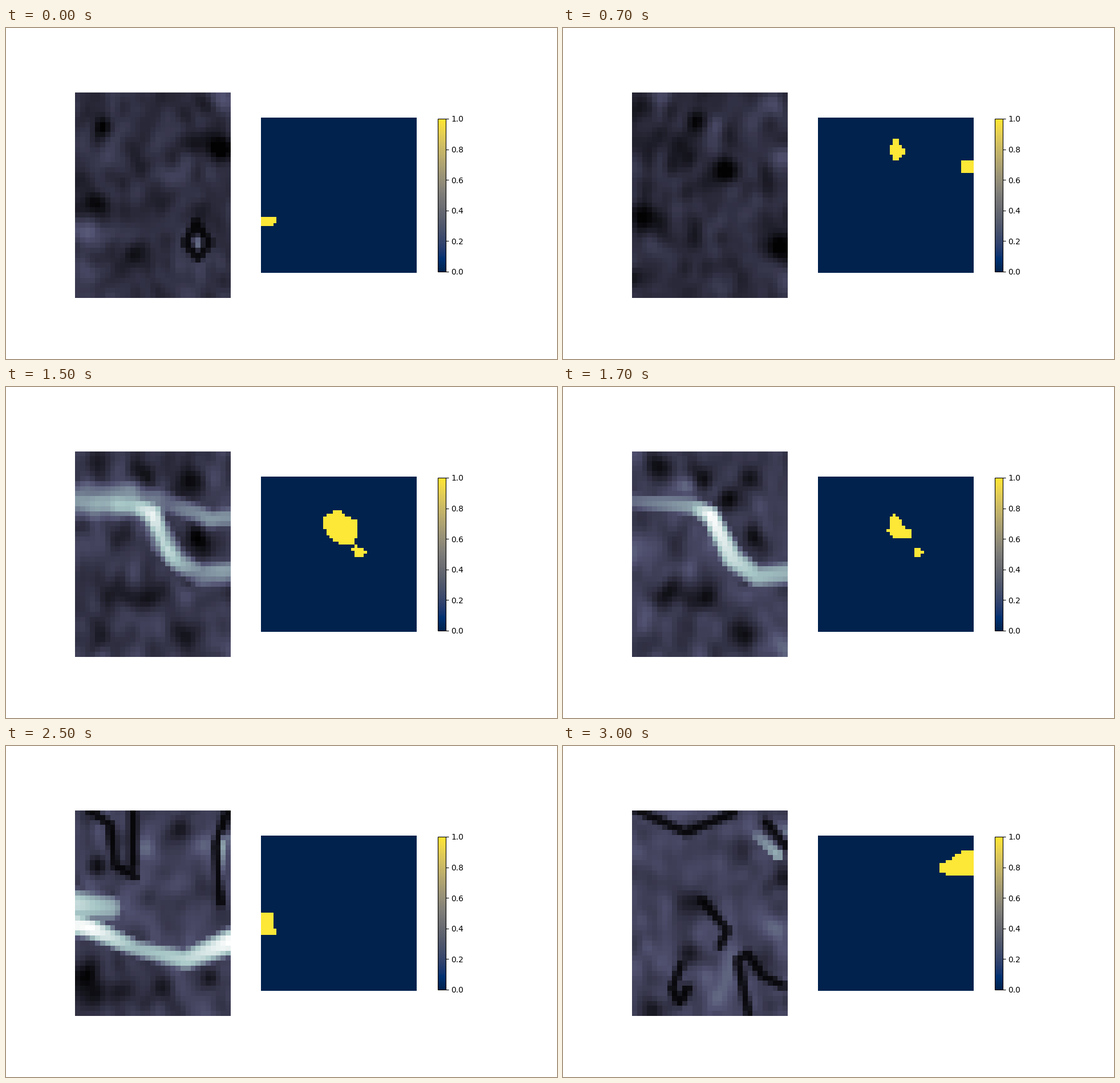
These frames come from a looping animation (966x580 px, 3.1 s). A matplotlib script:

```python
import numpy as np
import matplotlib.pyplot as plt
from matplotlib.animation import FuncAnimation
from matplotlib.path import Path

FRAMES, STEP_MS = 31, 100
ROWS, COLS, SIDE = 41, 31, 50

yy, xx = np.mgrid[:ROWS, :COLS] + 0.5
my, mx = np.mgrid[:SIDE, :SIDE]
centres = np.column_stack([mx.ravel(), my.ravel()]) + 0.5
keys = []


def texture(seed):
    """Smooth unit-variance grain, a little longer vertically."""
    down, across = 8, 4
    n = np.random.default_rng(seed).normal(size=(ROWS + down, COLS + across))
    for _ in range(down):
        n = n[1:] + n[:-1]
    for _ in range(across):
        n = n[:, 1:] + n[:, :-1]
    return n / n.std()


def spots(items):
    return sum(np.exp(-0.65 * ((xx - x) ** 2 + (yy - y) ** 2) / r ** 2)
               for x, y, r in items)


def stroke(points):
    """Soft polyline through (x, y, width, level) points."""
    p = np.array(points, float)
    t = np.linspace(0, len(p) - 1, 40 * len(p))
    x, y, w, v = (np.interp(t, range(len(p)), c)[:, None, None] for c in p.T)
    return (v * np.exp(-(np.hypot(xx - x, yy - y) / w) ** 3)).max(axis=0)


def nearest(cells):
    best = np.full((SIDE, SIDE), np.inf)
    for cy, cx in np.argwhere(cells):
        np.minimum(best, np.hypot(mx - cx, my - cy), out=best)
    return best


def signed_distance(polygons):
    inside = sum(Path(p).contains_points(centres) for p in polygons) > 0
    inside = inside.reshape(SIDE, SIDE)
    return nearest(~inside) * inside - nearest(inside) * ~inside


def add_key(frame, base, light, dark, mask, lines=(), cuts=()):
    scan = base + 0.13 * spots(light) - 0.2 * spots(dark)
    scan = np.clip(scan + 0.035 * texture(frame), 0.015, 1)
    for line in lines:
        scan = np.maximum(scan, stroke(line))
    for cut in cuts:
        scan *= 1 - stroke([(x, y, 1, 0.85) for x, y in cut])
    keys.append((frame, scan, signed_distance(mask)))


add_key(
    0, 0.22,
    light=[(30, 2, 2), (2, 28.5, 2.5), (24.5, 30, 1.3), (24.5, 30, 1)],
    dark=[(24, 10, 2), (29, 11, 2), (4.5, 21.7, 2), (11.5, 33, 2.2),
          (5.7, 7, 1.5)],
    mask=[[(0, 32), (5, 32), (5, 34), (4, 34), (4, 35), (0, 35)]],
    cuts=[[(24, 26), (22, 30), (24.5, 33), (26.7, 30), (24, 26)]])

add_key(
    7, 0.2,
    light=[(16.5, 6.5, 1.8), (15.8, 10.5, 2), (29.5, 12.5, 1.8), (28.5, 3, 2),
           (6, 1, 1.8)],
    dark=[(12.7, 5.5, 1.6), (18.5, 15.5, 2), (2.5, 24.5, 2.3), (30, 31, 2.2)],
    mask=[[(24, 7), (26, 7), (26, 8.8), (28.2, 11), (26, 14), (24, 14),
           (23.1, 11), (23.1, 9), (24, 9)],
          [(46, 14), (50, 14), (50, 18), (46, 18)]])

add_key(
    12, 0.2,
    light=[(28, 2, 3), (8, 4, 1.8)],
    dark=[(14, 4.2, 1.8), (20.5, 5, 2), (24, 18, 2.3), (2.5, 25, 2.3),
          (3, 33, 2)],
    mask=[[(0, 8.3), (22, 8.4), (22, 8.6), (27, 9.5), (35, 10.5), (42, 14.6),
           (50, 16.4), (50, 20), (33.6, 20), (32, 18), (32, 22), (33, 22),
           (33, 25), (32, 25), (32, 27), (23, 25.9), (23, 22.2), (19, 19.4),
           (10, 18.6), (4, 16), (4, 15), (0, 15)],
          [(16, 7), (18, 7), (18, 8), (16, 8)]],
    lines=[[(0, 10, 4.2, .85), (13, 10, 3.7, .93), (19, 10.4, 2.1, 1),
            (27, 13.6, 1.9, .98), (31, 13.2, 2, .93)],
           [(15, 12, 2.4, .83), (17, 19, 2, .8), (21, 23, 1.9, .52),
            (31, 23.3, 2, .54)]])

add_key(
    17, 0.27,
    light=[(1.5, 19, 2.5), (30, 39, 2.5), (10.3, 7, 1.8)],
    dark=[(5, 2.5, 2.2), (14, 5.8, 1.8), (19, 9.5, 1.8), (23.2, 5.5, 1.8),
          (25, 17.8, 2.2), (8, 28, 2.4), (14, 30, 2.2), (22, 36, 2.3)],
    mask=[[(24.2, 12), (25.2, 12.2), (28.3, 17), (30, 17), (30, 20), (24, 20),
           (22, 17), (23.2, 17), (23.2, 13)],
          [(31, 23), (33, 23), (34.2, 24.5), (33, 26), (31, 26)]],
    lines=[[(0, 10, 2.1, .45), (12, 11, 2.2, .63), (15.6, 12.7, 2, 1),
            (20, 21.5, 2.5, .85), (25, 25, 2.5, .72), (31, 24.3, 2.6, .68)]])

add_key(
    21, 0.29,
    light=[(30, 0, 1.7), (24.5, 7.5, 1.8), (17, 18, 1.8)],
    dark=[(18.8, 9.5, 2.3), (28.5, 14.5, 2.2), (3, 28.5, 2.2), (9, 32, 2.6),
          (14, 32, 2), (21.5, 35, 2), (13, 39.5, 2)],
    mask=[[(0, 22), (4, 22), (6.4, 25.5), (4, 30), (0, 30)]],
    lines=[[(0, 21.5, 2.4, .84), (4, 23, 2, .93), (13, 27.6, 2.2, .67),
            (21, 29.5, 2.5, .74), (31, 27.4, 2.5, .92)],
           [(0, 16, 3.6, .64), (9, 18.5, 3.6, .52)]],
    cuts=[[(3, 0), (8, 8.5)], [(8.3, 0), (12.3, 7.5)]])

add_key(
    25, 0.28,
    light=[(25.5, 7, 2), (13.5, 8, 1.8)],
    dark=[(5, 11, 1.8), (21.2, 4.3, 1.8), (2, 31.5, 2.6), (3.5, 37, 2.8),
          (10, 36, 2.2), (18, 35.5, 2.1), (27, 33.5, 1.6)],
    mask=[[(0, 25), (4, 25), (4, 30), (5, 30), (5, 32), (0, 32)]],
    lines=[[(0, 22.8, 2.6, .97), (3, 23.5, 2.4, 1), (12, 27.5, 2, .7),
            (22, 29.8, 2.4, .8), (31, 26.2, 2.9, 1)],
           [(0, 18.8, 3.4, .84), (7, 19.5, 3, .68)],
           [(29.8, 5, .9, .75), (29.7, 16, .8, .4)]],
    cuts=[[(3, 0), (7, 3), (8, 11), (12, 13.3)], [(11.5, 0), (11.7, 11)],
          [(30.5, 0), (28, 7), (29, 18.5)]])

add_key(
    30, 0.3,
    light=[(17.5, 36, 3.5), (29, 24, 1.8), (30.5, 4.7, 1.5)],
    dark=[(12.3, 18, 2.3), (11, 29, 2.2), (4, 39.5, 2.3), (29.8, 14, 1.8)],
    mask=[[(50, 5), (47.2, 5), (39.2, 9.3), (39.2, 12), (41, 12), (41, 13),
           (50, 13)]],
    lines=[[(25, 5.2, 1.6, .5), (29, 9, 1.5, .68)]],
    cuts=[[(1, 0), (10.7, 4.5), (20, .6)], [(26.7, 2.5), (31, 7.5)],
          [(14, 18), (19, 24), (17.5, 27)],
          [(23.3, 41), (21, 30), (23, 28.5), (26, 33), (30, 35)],
          [(9.7, 31), (8, 35.5), (9.5, 38.3), (11, 35.5)]])


def state(i):
    """Scan slice and mask, blended between the neighbouring keys."""
    j = max(k for k in range(len(keys) - 1) if keys[k][0] <= i)
    (a, scan_a, dist_a), (b, scan_b, dist_b) = keys[j:j + 2]
    t = (i - a) / (b - a)
    scan = (1 - t) * scan_a + t * scan_b + 0.1 * t * (1 - t) * texture(100 + i)
    return np.clip(scan, 0, 1), (1 - t) * dist_a + t * dist_b > 0


def show(ax, data, cmap):
    ax.axis("off")
    return ax.imshow(data, cmap=cmap, vmin=0, vmax=1, interpolation="nearest")


fig, axes = plt.subplots(1, 2, figsize=(9.66, 5.8), dpi=100)
scan, mask = state(0)
scan_im = show(axes[0], scan, "bone")
mask_im = show(axes[1], mask.astype(float), "cividis")
fig.colorbar(mask_im, ax=axes, shrink=0.6)


def draw(i):
    scan, mask = state(i)
    scan_im.set_data(scan)
    mask_im.set_data(mask.astype(float))
    return scan_im, mask_im


anim = FuncAnimation(fig, draw, frames=FRAMES, interval=STEP_MS,
                     repeat=True, repeat_delay=0)
plt.show()
```
